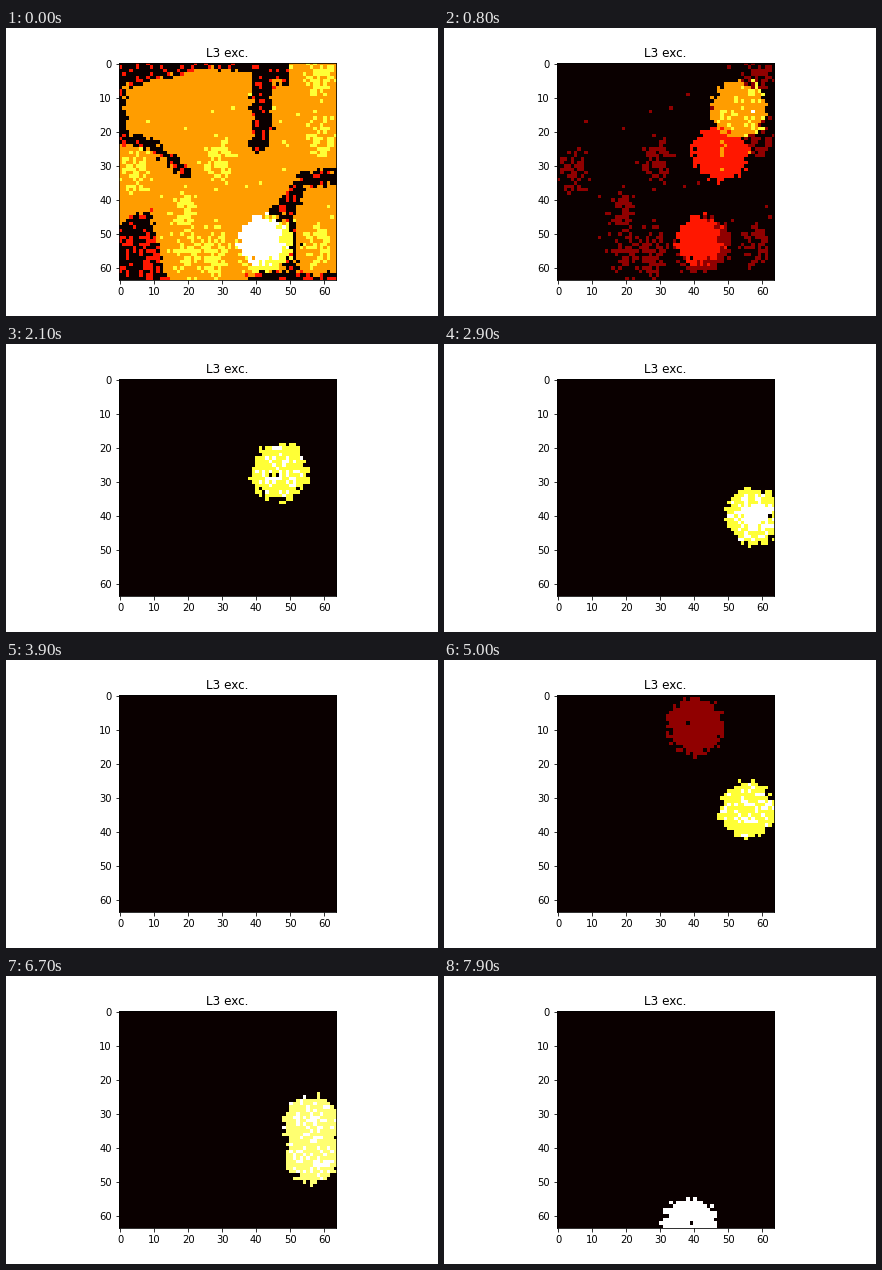
A matplotlib script for the animation above (8 s loop, 432 by 288 pixels).

```python
import numpy as np
import matplotlib.pyplot as plt
from matplotlib.animation import FuncAnimation

SIZE = 64
FRAMES = 80
STEP_MS = 100
WINDOW = 5  # steps over which spikes are counted
RADIUS = 8.6

rng = np.random.default_rng(7)
yy, xx = np.mgrid[0:SIZE, 0:SIZE].astype(float)


def noise():
    return rng.random((SIZE, SIZE))


def distance(x, y):
    return np.hypot(xx - x, yy - y)


def ragged_disc(x, y):
    return noise() < np.clip((RADIUS + 0.7 - distance(x, y)) / 2.2, 0, 0.99)


def path_depth(radius, *points):
    """Depth inside a thick path; negative outside."""
    t = np.linspace(0, len(points) - 1, 120)
    px, py = (np.interp(t, range(len(points)), axis) for axis in zip(*points))
    return radius - np.min([distance(x, y) for x, y in zip(px, py)], axis=0)


def quiet_depth():
    top = np.where(xx < 50, 4.2 + 2.5 * np.cos(xx * np.pi / 28) - yy, -9)
    corner = np.minimum(yy - 47 + xx / 2, 9 + (yy - 45) / 4 - xx)
    return np.max([
        top,
        corner,
        path_depth(1.6, (0, 6), (0, 22), (9, 23.5), (19, 32)),
        path_depth(2.8, (41.5, 0), (41.5, 18), (40.5, 23)),
        path_depth(2.2, (46, 43.5), (50, 40), (54, 34), (64, 33)),
        path_depth(1.5, (50, 40), (50, 62), (38, 63), (64, 63)),
    ], axis=0)


def lively_density():
    centres = [(58, 4), (59, 22), (29, 28), (5, 32),
               (19, 43), (20, 54), (28, 56), (58, 54)]
    q = np.min([((xx - x) / 4.3) ** 2 + ((yy - y) / 6.5) ** 2
                for x, y in centres], axis=0)
    return 0.015 + 0.6 * np.exp(-q * q)


def opening_map():
    counts = np.where(noise() < lively_density(), 4, 3)

    depth = quiet_depth()
    quiet = depth + rng.normal(0, 0.6, depth.shape) > 0
    red = np.where((yy > 49) & ((xx < 16) | (xx > 51)), 0.42, 0.17)
    counts[quiet] = np.where(noise() < red, 2, 0)[quiet]

    disc = ragged_disc(42.3, 52.8)
    core = np.clip((8.8 - distance(40.8, 52)) / 3, 0, 1)
    counts[disc] = np.where(noise() < core, 5, 4)[disc]
    return counts


class Spot:
    """Round patch of cells whose windowed spike count rises, holds and fades."""

    def __init__(self, x, y, start, end, base=4, bonus=0.45, avoid=None):
        self.start, self.end = start, end
        mask = ragged_disc(x, y)
        if avoid is not None:
            mask &= avoid.total == 0
        extra = np.floor(bonus * np.exp(-(distance(x, y) / 6) ** 2) + noise())
        self.total = (base + extra) * mask

    def counts(self, k):
        rate = np.maximum(1, self.total / WINDOW)
        rise = np.floor(max(0, k - self.start + 1) * rate + 1e-6)
        fade = self.total - max(0, k - self.end + 1)
        return np.clip(np.minimum(rise, fade), 0, None)


opening = opening_map()
# Touching pairs drive each other and reach higher counts
upper = Spot(53, 13.2, 6, 14, base=6, bonus=0.2)
lower = Spot(47.5, 26, 7, 14, base=6, bonus=1.2, avoid=upper)
right = Spot(56, 32.5, 63, 72, base=6)
below = Spot(56.5, 42, 63, 72, base=6, avoid=right)
spots = [
    upper, lower, right, below,
    Spot(46.8, 27, 15, 24),
    Spot(57.3, 40.3, 25, 35, bonus=1),
    Spot(55.5, 33.7, 41, 51),
    Spot(40.2, 8.9, 50, 60),
    Spot(38.3, 63, 77, FRAMES),
]


def activity(k):
    counts = np.clip(opening - max(0, k - 5), 0, None)
    return counts + sum(spot.counts(k) for spot in spots)


fig, ax = plt.subplots(figsize=(6, 4), dpi=72)
fig.subplots_adjust(left=0.125, right=0.9, bottom=0.125, top=0.88)
image = ax.imshow(opening, cmap="hot", interpolation="nearest")
ax.set_title("L3 exc.")
ax.set_xticks(range(0, SIZE, 10))
ax.set_yticks(range(0, SIZE, 10))


def update(k):
    counts = activity(k)
    image.set_data(counts)
    image.set_clim(0, max(1, counts.max()))
    return [image]


animation = FuncAnimation(fig, update, frames=FRAMES, interval=STEP_MS,
                          repeat=True, repeat_delay=0)
plt.show()
```
